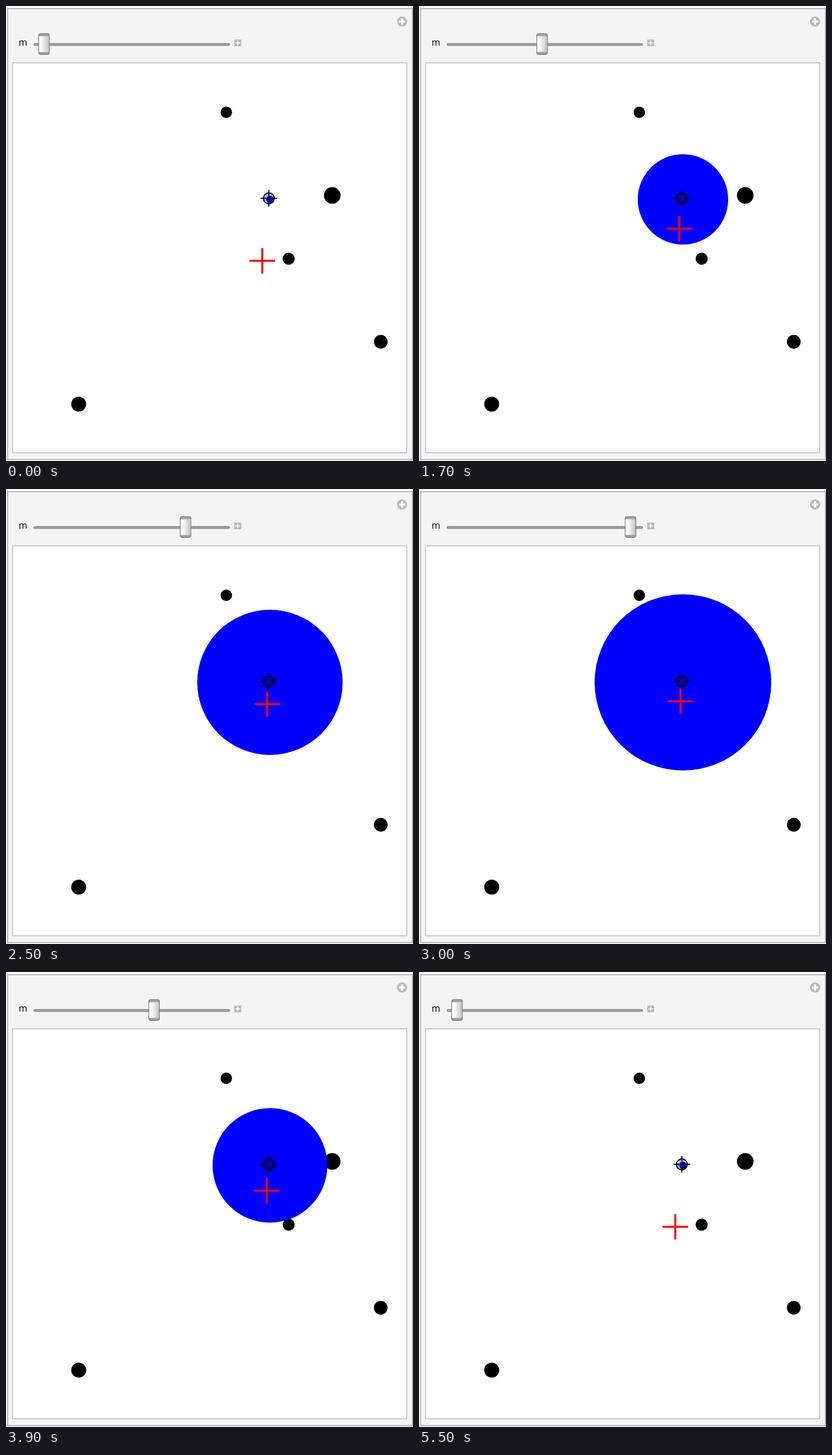
Recreate the animation shown at these times as an HTML page. Size 707x792 px, loop 8000 ms.

```html
<!DOCTYPE html>
<html lang="en">
<head>
<meta charset="utf-8">
<title>Centre of mass</title>
<style>
  html, body { margin: 0; width: 100%; height: 100%; overflow: hidden; background: #fff; }
  svg { display: block; }
  text { font: 16px "Open Sans", "Noto Sans", sans-serif; }
</style>
</head>
<body>
<svg width="707" height="792" viewBox="0 0 707 792">
  <defs>
    <linearGradient id="face">
      <stop offset="0" stop-color="#fff"/>
      <stop offset=".3" stop-color="#f6f6f6"/>
      <stop offset="1" stop-color="#c4c4c4"/>
    </linearGradient>
    <linearGradient id="rail" x2="0" y2="1">
      <stop offset="0" stop-color="#8c8c8c"/>
      <stop offset="1" stop-color="#b8b8b8"/>
    </linearGradient>
  </defs>

  <!-- panel -->
  <rect x="2.8" y="4.6" width="703.2" height="785" fill="#f4f4f4" stroke="#a9a9a9" stroke-width="1.7"/>
  <rect x="11.5" y="99" width="684.5" height="678.7" fill="#fff" stroke="#bdbdbd" stroke-width="1.5"/>
  <circle cx="688" cy="27" r="8.9" fill="#b9b9b9"/>
  <path d="M682.6 27h10.8M688 21.6v10.8" stroke="#fff" stroke-width="3.4"/>
  <rect x="396.5" y="58.5" width="12" height="11.5" fill="#b5b5b5"/>
  <path d="M398.5 64.2h8M402.5 60.2v8" stroke="#fff" stroke-width="2"/>

  <!-- slider -->
  <text x="22" y="69">m</text>
  <rect x="48.5" y="65.2" width="340" height="3.7" rx="1.8" fill="url(#rail)" stroke="#777"/>
  <g id="thumb">
    <rect x="-9.2" y="48" width="18.4" height="36.3" rx="3.5" fill="#a2a2a2" stroke="#6f6f6f" stroke-width="1.2"/>
    <rect x="-8.6" y="52.5" width="17.2" height="27.5" rx="1" fill="url(#face)"/>
  </g>

  <!-- masses -->
  <g id="dots"></g>
  <circle id="mass" cx="458.5" cy="336.6" fill="#00f"/>
  <path id="centre" d="M-22.2 0h44.4M0-22.2v44.4" stroke="#f00" stroke-width="3.5"/>

  <!-- locator -->
  <g transform="translate(456.6 334.8)" stroke="#000" stroke-width="1.9">
    <circle r="9.5" fill="#000" fill-opacity=".28"/>
    <path d="M-14.5 0h10.5M4 0h10.5M0-14.5v10.5M0 4v10.5"/>
  </g>
</svg>
<script>
  const LOOP = 8000, START = 500, STEP = 100, LAST = 5500;
  const SPEED = 12.24;   // slider pixels per step
  const RANGE = 304.2;   // slider travel

  const el = id => document.getElementById(id);
  const thumb = el('thumb'), mass = el('mass'), centre = el('centre');

  el('dots').innerHTML = [
    [382.7, 185, 10], [566.7, 329.7, 14.4], [491, 439.8, 10.5],
    [651, 584.5, 11.9], [126.3, 693, 13]
  ].map(([x, y, r]) => `<circle cx="${x}" cy="${y}" r="${r}"/>`).join('');

  // slider travel: up, then back down, in discrete steps
  function travel(t) {
    if (t < START || t >= LAST) return 0;
    const up = Math.floor((t - START) / STEP) * SPEED + 1;
    return Math.max(0, Math.min(up, 2 * RANGE - up));
  }

  const place = (node, x, y) => node.setAttribute('transform', `translate(${x} ${y})`);

  function draw(t) {
    const p = travel(t);
    const pull = 1 + 0.00747 * p;   // total mass relative to the fixed dots
    place(thumb, 66 + p, 0);
    mass.setAttribute('r', 6.4 + 0.4878 * p);
    place(centre, 458.3 - 13.1 / pull, 336.6 + 107 / pull);
  }

  function tick() {
    draw(performance.now() % LOOP);
    requestAnimationFrame(tick);
  }
  tick();
</script>
</body>
</html>
```
